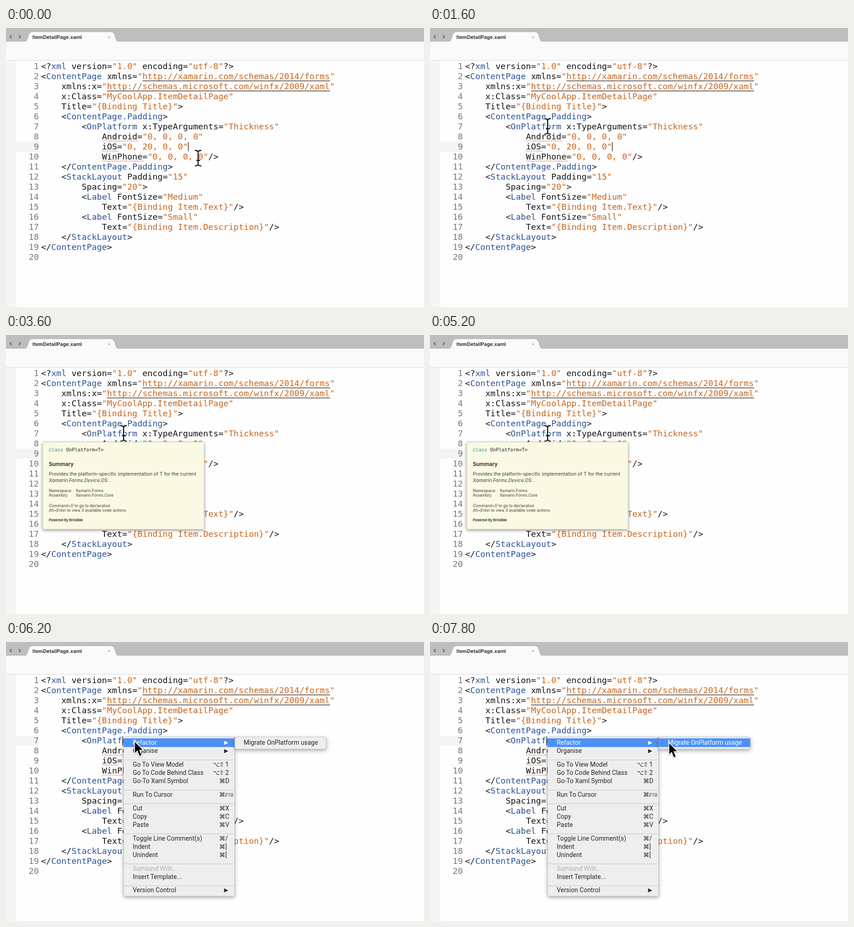
Animation, 917 px wide and 611 px high, one loop 8000 ms. Source, as an HTML page:

```html
<!DOCTYPE html>
<html lang="en">
<head>
<meta charset="utf-8">
<title>Code editor</title>
<style>
html, body { margin: 0; width: 100%; height: 100%; overflow: hidden; background: #fefefe; }
svg { display: block; width: 100vw; height: 100vh; }
text { white-space: pre; }
.code { font: 18.47px "DejaVu Sans Mono", monospace; fill: #161616; }
.tag { fill: #2d5598; }
.str { fill: #c9661e; }
.num { fill: #797979; text-anchor: end; }
.rule { stroke: #4a3c32; stroke-width: 1.6; }
.wave { fill: none; stroke: #dc7a72; stroke-width: 1; }
.tab { font: 600 10.9px Inter, sans-serif; fill: #222; }
.tip { font: 10.42px Inter, sans-serif; fill: #3c3c3a; }
.tip .small { font-size: 8.6px; }
.tip .mono { font: 10.5px "DejaVu Sans Mono", monospace; fill: #222; }
.tip .head { font-size: 11.6px; font-weight: 700; }
.tip .foot { font-size: 7.4px; font-weight: 700; }
.tip .it { font-style: italic; }
.menu { font: 13.9px Roboto, sans-serif; fill: #262626; }
.sym { font: 13.5px "DejaVu Sans", sans-serif; }
.fkey { font-size: 10.5px; }
.off { fill: #adadad; }
.lit { fill: #fff; }
.hot { fill: #4c91f7; }
.caret { stroke: #111; stroke-width: 1.3; }
.panel { fill: #eee; stroke: #bdbdbd; stroke-width: .8; filter: drop-shadow(0 3px 4px #0005); }

.before, .after, #tip, #hot, #sub, #subhot { animation: 8s step-end infinite; }
.before { animation-name: before; }
.after { animation-name: after; }
#tip { animation-name: tip; }
#hot { animation-name: hot; }
#sub { animation-name: sub; }
#subhot { animation-name: subhot; }
#beam { animation: beam 8s linear infinite; }
#arrow { animation: arrow 8s linear infinite; }
@keyframes before { 0% { opacity: 1 } 70%, 100% { opacity: 0 } }
@keyframes after { 0% { opacity: 0 } 70%, 100% { opacity: 1 } }
@keyframes tip { 0% { opacity: 0 } 22.5% { opacity: 1 } 70%, 100% { opacity: 0 } }
@keyframes hot { 0% { opacity: 0 } 72.5%, 100% { opacity: 1 } }
@keyframes sub { 0% { opacity: 0 } 75%, 100% { opacity: 1 } }
@keyframes subhot { 0% { opacity: 0 } 90%, 100% { opacity: 1 } }
@keyframes beam {
  0%, 2.5% { transform: translate(421.5px, 285px); animation-timing-function: steps(5, jump-start) }
  15%, 100% { transform: translate(258px, 215.5px) }
}
@keyframes arrow {
  0%, 70% { transform: translate(259px, 213px); animation-timing-function: steps(2, end) }
  75%, 80% { transform: translate(282px, 217px); animation-timing-function: steps(5, end) }
  92.5%, 100% { transform: translate(524px, 220px) }
}
</style>
</head>
<body>
<svg viewBox="0 0 917 611" preserveAspectRatio="none">
  <rect width="917" height="611" fill="#fefefe"/>
  <rect y="71" width="22.5" height="540" fill="#f5f5f5"/>
  <rect width="917" height="30" fill="#bfbebe"/>
  <rect y="30" width="917" height="41" fill="#fafafa"/>
  <rect y="70" width="917" height="1.5" fill="#e3e3e3"/>
  <path d="M42 30.5Q46 29 48 23L51 14Q53 9 59 9H229Q235 9 237 14L240 23Q242 29 245 30.5Z" fill="#fafafa"/>
  <path d="M12.5 15.5L8.5 19 12.5 22.5M28 15.5L32 19 28 22.5" fill="none" stroke="#444" stroke-width="1.3"/>
  <path d="M223.500 17.500l5 5m0-5l-5 5" stroke="#a0a0a0"/>
  <text class="tab" x="58" y="24">ItemDetailPage.xaml</text>

  <rect class="before" y="249" width="72" height="22" fill="#f4f4f4"/>
  <rect class="after" y="205" width="72" height="22" fill="#f4f4f4"/>
  <g id="code" class="code"></g>
  <g class="before"><path class="caret" d="M400 250V270"/></g>
  <g class="after"><path class="caret" d="M256 206V227"/></g>

  <g id="tip" class="tip">
    <rect x="80.5" y="234.5" width="354" height="191" rx="3" fill="#f9f9e4" stroke="#c6c6b8" stroke-width=".8" style="filter:drop-shadow(0 2px 3px #0006)"/>
    <g id="tiptext"></g>
  </g>

  <g class="menu after">
    <rect class="panel" x="258" y="208" width="243.5" height="348.5" rx="4.5"/>
    <g id="items"></g>
    <g id="hot">
      <rect class="hot" x="258" y="211" width="243.5" height="19"/>
      <text class="lit" x="278" y="225.2">Refactor</text>
      <path class="lit" d="M478.500 216.200l9 4.500-9 4.500z"/>
    </g>
  </g>
  <g id="sub" class="menu">
    <rect class="panel" x="502" y="208" width="200.5" height="26.5" rx="4"/>
    <text x="521.5" y="225.2">Migrate OnPlatform usage</text>
    <g id="subhot">
      <rect class="hot" x="502" y="211" width="200.5" height="19"/>
      <text class="lit" x="521.5" y="225.2">Migrate OnPlatform usage</text>
    </g>
  </g>

  <defs>
    <path id="ibeam" d="M-7-17Q-1-17 0-13.500Q1-17 7-17M0-14V14M-7 17Q-1 17 0 13.500Q1 17 7 17M-4 5H4" fill="none"/>
  </defs>
  <g class="before"><g id="beam">
    <use href="#ibeam" stroke="#fff" stroke-opacity=".7" stroke-width="4"/>
    <use href="#ibeam" stroke="#111" stroke-width="2.4"/>
  </g></g>
  <g class="after"><g id="arrow">
    <path d="M0 0V27.500L6 22 10.500 33.500 16 31 11.300 20H19.500Z" fill="#080808" stroke="#fff" stroke-width="1.6" style="filter:drop-shadow(0 1px 1px #0005)"/>
  </g></g>
</svg>
<script>
const source = `<?xml version="1.0" encoding="utf-8"?>
<ContentPage xmlns="http://xamarin.com/schemas/2014/forms"
    xmlns:x="http://schemas.microsoft.com/winfx/2009/xaml"
    x:Class="MyCoolApp.ItemDetailPage"
    Title="{Binding Title}">
    <ContentPage.Padding>
        <OnPlatform x:TypeArguments="Thickness"
            Android="0, 0, 0, 0"
            iOS="0, 20, 0, 0"
            WinPhone="0, 0, 0, 0"/>
    </ContentPage.Padding>
    <StackLayout Padding="15"
        Spacing="20">
        <Label FontSize="Medium"
            Text="{Binding Item.Text}"/>
        <Label FontSize="Small"
            Text="{Binding Item.Description}"/>
    </StackLayout>
</ContentPage>
`;
const LEFT = 77, ADVANCE = 11.12, BASELINE = 90, LEADING = 22;
const escapeText = s => s.replace(/&/g, '&amp;').replace(/</g, '&lt;').replace(/>/g, '&gt;');
const span = (cls, s) => `<tspan class="${cls}">${escapeText(s)}</tspan>`;
const text = (x, y, s, cls = '') => `<text x="${x}" y="${y}" class="${cls}">${s}</text>`;
const fill = (id, html) => document.getElementById(id).innerHTML = html;

const highlight = line => line.replace(/("[^"]*")|(<[\/?]?)([\w.]+)|[^"<]+/g,
  (all, str, open, tag) => str ? span('str', str)
    : tag ? escapeText(open) + span('tag', tag) : escapeText(all));

function squiggle(x, y, width) {
  let d = `M${x} ${y}`;
  for (let i = 0; i < width / 4; i++) d += 'q1-2.6 2 0t2 0';
  return `<path class="wave" d="${d}"/>`;
}

fill('code', source.split('\n').map((line, i) => {
  const y = BASELINE + i * LEADING;
  const column = line.search(/\S|$/);
  const at = n => LEFT + n * ADVANCE;
  let out = text(72, y, i + 1, 'num') + text(at(column), y, highlight(line.trim()));
  const url = line.match(/http:[^"]+/);
  if (url) out += `<path class="rule" d="M${at(url.index)} ${y + 3.8}H${at(url.index + url[0].length)}"/>`;
  const platform = line.match(/Android|iOS|WinPhone/);
  if (platform) out += squiggle(at(column), y + 3.5, platform[0].length * ADVANCE);
  return out;
}).join(''));

const italic = s => span('it', s);
fill('tiptext', [
  [254.5, '<tspan fill="#2f8f92">class</tspan> OnPlatform&lt;T&gt;', 'mono'],
  [287.3, 'Summary', 'head'],
  [308, 'Provides the platform-specific implementation of T for the current'],
  [321.7, italic('Xamarin.Forms.Device.OS') + ' .'],
  [343.8, 'Namespace:<tspan x="153">Xamarin.Forms</tspan>', 'small'],
  [354.4, 'Assembly:<tspan x="153">Xamarin.Forms.Core</tspan>', 'small'],
  [376.8, italic('Command+D') + ' to go to declaration', 'small'],
  [387.3, italic('Alt+Enter') + ' to view 3 available code actions', 'small'],
  [408.3, 'Powered By Brindlok', 'foot']
].map(([y, s, cls]) => text(94, y, s, cls)).join(''));

const groups = [
  [['Refactor', '>'], ['Organise', '>']],
  [['Go To View Model', '⌥⇧1'], ['Go To Code Behind Class', '⌥⇧2'], ['Go-To Xaml Symbol', '⌘D']],
  [['Run To Cursor', '⌘F10']],
  [['Cut', '⌘X'], ['Copy', '⌘C'], ['Paste', '⌘V']],
  [['Toggle Line Comment(s)', '⌘/'], ['Indent', '⌘]'], ['Unindent', '⌘[']],
  [['Surround With...', ''], ['Insert Template...', '']],
  [['Version Control', '>']]
];
function shortcut(keys, y) {
  if (keys === '>') return `<path d="M478.5 ${y - 9}l9 4.5-9 4.5z"/>`;
  const mods = keys.match(/[⌥⇧⌘]/g) || [];
  const key = keys.slice(mods.length);
  return mods.map((m, i) => text(467.5 - 14 * (mods.length - 1 - i), y, m, 'sym')).join('')
    + text(481, y, key, key.length > 1 ? 'fkey' : '');
}
let y = 225.2, menu = '';
groups.forEach((group, g) => {
  if (g) {
    menu += `<path d="M258.5 ${y - 3.2}H501" stroke="#d7d7d7" stroke-width="1.8"/>`;
    y += 11.4;
  }
  for (const [label, keys] of group) {
    menu += text(278, y, label, label.startsWith('Surround') ? 'off' : '') + shortcut(keys, y);
    y += 18.2;
  }
});
fill('items', menu);
</script>
</body>
</html>
```
